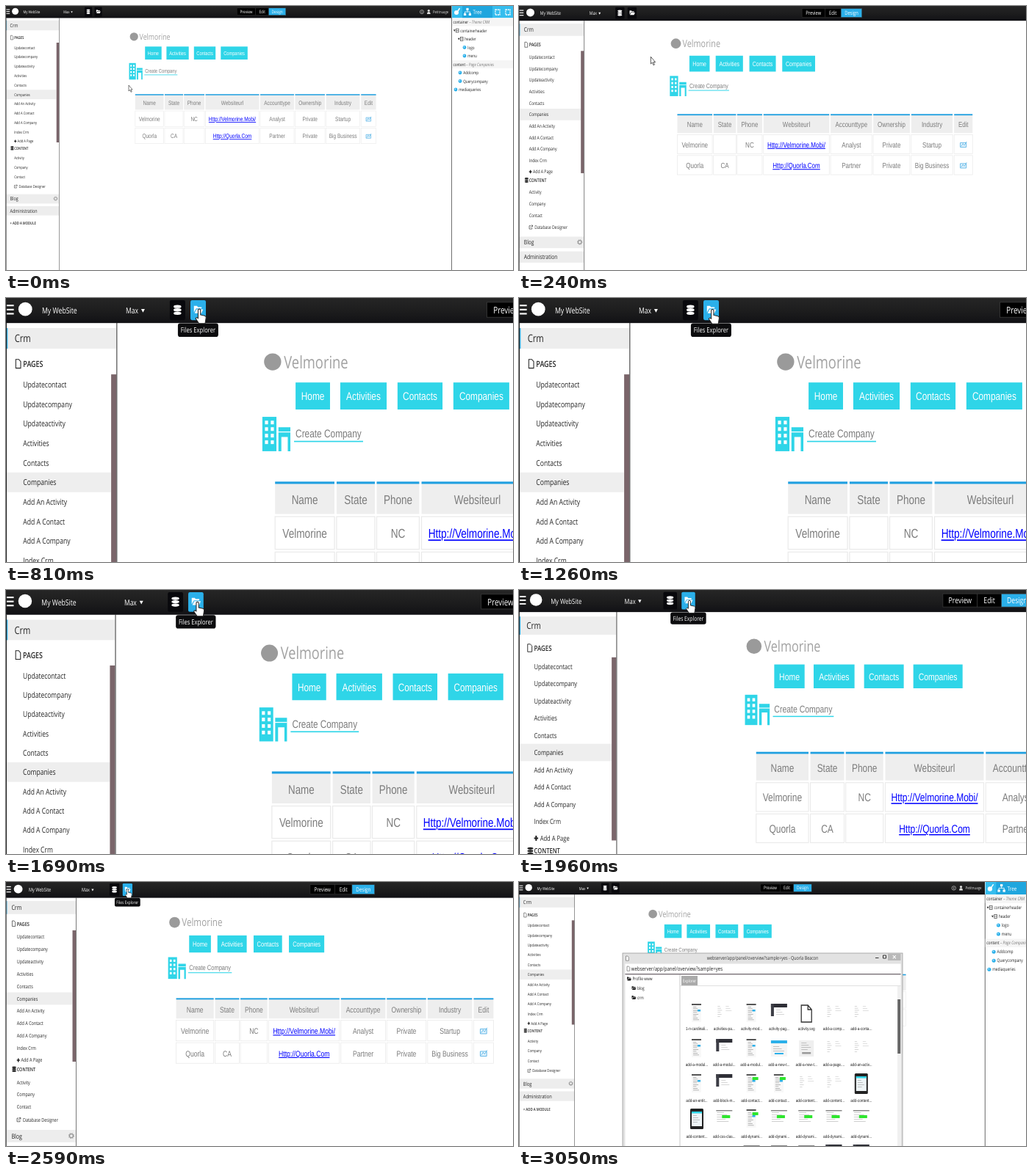
An HTML page for the animation above (5.18 s loop, 690x360 px).

```html
<!DOCTYPE html>
<html lang="en">
<head>
<meta charset="utf-8">
<title>Files explorer demo</title>
<style>
  html, body { margin: 0; width: 100%; height: 100%; overflow: hidden; background: #fff; }
  svg { display: block; width: 690px; height: 360px; }
  text { font-family: "Open Sans", sans-serif; text-rendering: geometricPrecision; white-space: pre; }
  .page { font-family: "Liberation Sans", Arial, sans-serif; }
  .semi { font-weight: 600; }
  .link { text-decoration: underline; }
</style>
</head>
<body>
<svg id="stage" viewBox="0 0 690 360"></svg>
<script>
const LOOP = 5180, STEP = 30;
const SQUEEZE = 0.78;
const CYAN = '#2fd5e8', BLUE = '#2bb0ea', INK = '#262626', GREY = '#7c7c7c';

// ---- drawing helpers; text is centred vertically on y ----
const rect = (x, y, w, h, fill, extra = '') =>
  `<rect x="${x}" y="${y}" width="${w}" height="${h}" fill="${fill}" ${extra}/>`;
const circle = (x, y, r, fill, extra = '') =>
  `<circle cx="${x}" cy="${y}" r="${r}" fill="${fill}" ${extra}/>`;
const path = (d, fill, stroke = 'none', width = 1) =>
  `<path d="${d}" fill="${fill}" stroke="${stroke}" stroke-width="${width}"/>`;
const text = (x, y, str, size, fill, cls = '', anchor = 'start') =>
  `<text transform="translate(${x} ${y + size * 0.36}) scale(${SQUEEZE} 1)" font-size="${size}"
    fill="${fill}" class="${cls}" text-anchor="${anchor}">${str}</text>`;
const mid = (x, y, str, size, fill, cls) => text(x, y, str, size, fill, cls, 'middle');
const group = (id, content) => `<g id="${id}">${content}</g>`;

const database = (x, y, k, fill) => [-2, 0, 2].map(i =>
  `<ellipse cx="${x}" cy="${y + i * k}" rx="${2.3 * k}" ry="${0.95 * k}" fill="${fill}"/>`).join('');
const folder = (x, y, k, fill) =>
  path(`M${x} ${y}h${2 * k}l${0.6 * k} ${0.8 * k}h${2.4 * k}v${0.9 * k}h${-3.6 * k}l${-1.4 * k} ${2.6 * k}z` +
       `M${x + 1.7 * k} ${y + 2.2 * k}h${4.3 * k}l${-1.1 * k} ${2.6 * k}h${-4.5 * k}z`, fill);
const sheet = (x, y) => path(`M${x} ${y}h2.4l1.4 1.6v4.6h-3.8z`, '#fff', '#555', 0.6);

// ---- top bar ----
function topBar() {
  const modes = [['Preview', 314.2, 339.7], ['Edit', 339.7, 357.5], ['Design', 357.5, 380.8]];
  return rect(0, 0, 690, 16.4, 'url(#bar)') +
    [4.9, 7.6, 10.3].map(y => rect(0.5, y - 0.5, 4.6, 1, '#fff')).join('') +
    circle(12.6, 7.3, 4.5, '#fff') +
    text(23.5, 8.2, 'My WebSite', 5.4, '#fff') +
    text(78.2, 8.2, 'Max', 5.3, '#fff') +
    path('M88.3 7.2h2.4l-1.2 2.3z', '#fff') +
    rect(107, 1.5, 10.1, 13, '#08080c', 'rx="1"') + database(112, 7.8, 1.1, '#fff') +
    rect(120.5, 1.5, 10.1, 13, '#08080c', 'rx="1"') +
    group('active', rect(120.5, 1.5, 10.1, 13, BLUE, 'rx="1"')) +
    folder(122.8, 5.2, 1, '#fff') +
    modes.map(([label, a, b], i) =>
      rect(a, 2.8, b - a, 9.8, i === 2 ? BLUE : '#000', 'stroke="#3a3a3a" stroke-width=".4"') +
      mid((a + b) / 2, 7.8, label, 6.1, '#fff')).join('') +
    circle(566, 8, 2.6, 'none', 'stroke="#ddd" stroke-width=".6"') + rect(565.7, 6.6, 0.7, 3, '#ddd') +
    circle(575.3, 6.3, 1.5, '#ddd') + path('M573 11q0-3 2.3-3t2.3 3z', '#ddd') +
    text(581, 8, 'Petitnuage', 5.4, '#ddd');
}

// ---- left sidebar ----
function sidebar() {
  const pages = ['Updatecontact', 'Updatecompany', 'Updateactivity', 'Activities', 'Contacts',
    'Companies', 'Add An Activity', 'Add A Contact', 'Add A Company', 'Index Crm'];
  const tab = (y, h, label) => rect(0.5, y, 71.5, h, '#ededed') +
    text(5.6, y + h / 2, label, 6.9, INK);
  return rect(0, 16.3, 72.5, 344, '#fff') +
    tab(19.7, 13.5, 'Crm') + rect(0.5, 19.7, 0.6, 13.5, BLUE) +
    path('M6.4 40.2h2l1.2 1.4v4.3h-3.2z', 'none', INK, 0.5) +
    text(11.2, 43.2, 'PAGES', 5.5, INK, 'semi') +
    rect(0.5, 114.2, 68, 12.9, '#eee') +
    pages.map((p, i) => text(11.2, 56.7 + 12.8 * i, p, 5.3, INK)).join('') +
    path('M11.2 184.4h3M12.7 182.5v3.8', 'none', '#222', 1.1) +
    text(15.6, 184.4, 'Add A Page', 5.3, INK) +
    database(8.4, 193.8, 0.95, INK) + text(11.2, 193.8, 'CONTENT', 5.3, INK, 'semi') +
    ['Activity', 'Company', 'Contact'].map((p, i) => text(11.2, 207.3 + 12.8 * i, p, 5.3, INK)).join('') +
    path('M13 244.5h-1.6v3.6h3v-1.4M12.7 246.7l2.2-2.5M13.5 244h1.6v1.8', 'none', INK, 0.5) +
    text(17.4, 246, 'Database Designer', 5.3, INK) +
    rect(68.7, 50, 3.4, 136, '#7a656a') +
    tab(256.6, 12.8, 'Blog') +
    circle(67.5, 262.7, 1.9, 'none', 'stroke="#999" stroke-width="1"') +
    circle(67.5, 262.7, 2.6, 'none', 'stroke="#999" stroke-width=".8" stroke-dasharray="1 1.04"') +
    tab(273, 12.6, 'Administration') +
    text(5.4, 296, '+ ADD A MODULE', 5.4, INK, 'semi') +
    rect(72.1, 16.3, 0.6, 344, '#555') + rect(0, 16.3, 0.5, 344, '#222');
}

// ---- web page in the middle ----
function building() {
  const windows = [80.3, 84.6, 88.9, 93.2].map(y =>
    rect(169.2, y, 2, 2.4, '#fff') + rect(173, y, 2, 2.4, '#fff')).join('');
  return rect(167.5, 77.8, 9.2, 22.5, CYAN) + windows +
    path('M178 84.6h7.8v15.7h-1.7v-9.3h-4.2v9.3h-1.9z', CYAN) +
    rect(177.6, 87.4, 8.2, 0.6, '#fff');
}

function table() {
  const cols = [[175.8, 214.6], [216, 241], [242.2, 270], [271.5, 344.5],
    [346, 392], [393.4, 434], [435.6, 481.5], [483.2, 503.6]];
  const head = ['Name', 'State', 'Phone', 'Websiteurl', 'Accounttype', 'Ownership', 'Industry', 'Edit'];
  const rows = [
    ['Velmorine', '', 'NC', 'Http://Velmorine.Mobi/', 'Analyst', 'Private', 'Startup'],
    ['Quorla', 'CA', '', 'Http://Quorla.Com', 'Partner', 'Private', 'Big Business']];
  return cols.map(([a, b], c) => {
    const x = (a + b) / 2, w = b - a;
    return rect(a, 121, w, 20.4, '#eee') + rect(a, 120.2, w, 1.5, '#1f9fe0') +
      mid(x, 132, head[c], 8.3, GREY, 'page') +
      rows.map((row, r) => {
        const y = 154.1 + 23.2 * r;
        const content = c === 7
          ? path(`M${x - 3.4} ${y + 3}v-5h6.6v5zM${x - 2.4} ${y + 2}l2-3 1.4 2 2.6-4.2`, '#e4f4fd', '#5ab4e6', 0.7)
          : mid(x, y, row[c], 8.4, c === 3 ? '#00f' : GREY, c === 3 ? 'page link' : 'page');
        return rect(a, y - 11, w, 21.4, '#fff', 'stroke="#eaeaea" stroke-width=".6"') + content;
      }).join('');
  }).join('');
}

function webPage() {
  const nav = [['Home', 189.2, 211.7], ['Activities', 218.4, 248.7],
    ['Contacts', 255.8, 285.2], ['Companies', 292.3, 328.8]];
  return group('band', rect(72.5, 16.3, 540, 29, '#efefef')) +
    circle(174.2, 41.8, 5.6, '#9a9a9a') +
    text(181.6, 41.8, 'Velmorine', 11.3, '#a2a2a2') +
    nav.map(([label, a, b]) => rect(a, 55.3, b - a, 17.7, CYAN) +
      mid((a + b) / 2, 64.2, label, 7.3, '#fff', 'page')).join('') +
    building() +
    text(189.2, 88.5, 'Create Company', 7.3, GREY, 'page') +
    rect(188.2, 93.5, 45.1, 0.8, CYAN) +
    table();
}

// ---- tree panel on the right ----
function treePanel() {
  const row = i => 22 + 11.5 * i;
  const title = (i, name, note) => rect(607, row(i) - 5.4, 83, 10.8, '#f5f5f5') +
    text(608.4, row(i), `${name} <tspan fill="#777" font-style="italic">– ${note}</tspan>`, 6, '#222');
  const branch = (i, x, name) => path(`M${x} ${row(i) - 1.2}h2.6l-1.3 2.6z`, INK) +
    rect(x + 3.6, row(i) - 2.4, 3.4, 4.8, '#fff', 'stroke="#444" stroke-width=".7"') +
    path(`M${x + 3.6} ${row(i)}h3.4`, 'none', '#444', 0.6) + text(x + 9.2, row(i), name, 6, '#222');
  const leaf = (i, x, name) => circle(x, row(i), 2.4, BLUE) + circle(x - 0.5, row(i) - 0.6, 0.8, '#bfe8fa') +
    text(x + 4.2, row(i), name, 6, '#222');
  const square = x => rect(x - 3, 5, 6, 7, 'none', 'stroke="#fff" stroke-width="1.3" stroke-dasharray="2 .8"');
  return rect(606.4, 0, 84, 360, '#fff') + rect(606.2, 16, 0.7, 344, '#333') +
    rect(607, 0, 83, 16.2, '#35bdee') + rect(621, 0, 41, 16.2, '#1fa6de') +
    circle(613, 9, 3, '#fff') + path('M613.5 9l4-6', 'none', '#fff', 1.4) +
    path('M628 4v4M624.5 11v-3h7v3', 'none', '#fff', 0.8) +
    rect(626.4, 2.8, 3.2, 3, '#fff') + rect(623, 10, 3.2, 3, '#fff') + rect(629.8, 10, 3.2, 3, '#fff') +
    text(635.5, 8.4, 'Tree', 7.8, '#fff') + square(669) + square(683) +
    title(0, 'container', 'Theme CRM') + branch(1, 609, 'containerheader') + branch(2, 615, 'header') +
    leaf(3, 624, 'logo') + leaf(4, 624, 'menu') +
    title(5, 'content', 'Page Companies') + leaf(6, 618, 'Addcomp') + leaf(7, 618, 'Querycompany') +
    leaf(8, 612, 'mediaqueries');
}

// ---- explorer window ----
function lines(x, y, w, n, gap, fill) {
  let out = '';
  for (let i = 0; i < n; i++) out += rect(x, y + i * gap, w * (0.55 + 0.45 * ((i * 7 % 5) / 4)), 0.7, fill);
  return out;
}

// One thumbnail per letter, centred on x
const thumbs = {
  n: (x, y) => rect(x - 7, y - 12, 13, 25, '#f8f8f8') + rect(x - 7, y - 12, 13, 2, '#555') +
    lines(x - 5, y - 8, 8, 8, 2.5, '#999') + rect(x + 1, y - 4, 4, 2.5, BLUE),
  w: (x, y) => lines(x - 9, y - 9, 6, 6, 2.8, '#c4c4c4') + lines(x + 2, y - 9, 8, 3, 3, '#d2d2d2'),
  d: (x, y) => rect(x - 11, y - 12, 22, 5, '#2e2f36') + rect(x - 11, y - 12, 4, 17, '#3c3d45') +
    lines(x - 4, y - 4, 11, 3, 3, '#c4c4c4'),
  f: (x, y) => path(`M${x - 7} ${y - 10}h9l5 6v17h-14zM${x + 2} ${y - 10}v6h5`, '#fff', '#333', 1.3),
  c: (x, y) => rect(x - 11, y - 10, 22, 22, '#f5f5f5') + rect(x - 11, y - 10, 22, 4, BLUE) +
    lines(x - 8, y - 2, 15, 3, 3, '#aaa') + rect(x - 6, y + 7, 12, 2, BLUE),
  e: (x, y) => rect(x - 10, y - 10, 20, 22, '#efefef') + lines(x - 7, y - 7, 13, 4, 3, '#aaa') +
    rect(x - 6, y + 6, 12, 2.5, '#999'),
  t: (x, y) => rect(x - 9, y - 13, 18, 28, '#222', 'rx="1.5"') + rect(x - 7, y - 9, 14, 20, '#eef4f6') +
    rect(x - 7, y - 9, 14, 2.5, CYAN) + lines(x - 5, y - 4, 9, 4, 3, '#aaa'),
  k: (x, y) => thumbs.n(x, y) + rect(x + 1, y - 8, 8, 4, '#2ee62e'),
  g: (x, y) => rect(x - 11, y - 11, 22, 1.5, '#888') + lines(x - 10, y - 8, 18, 5, 3, '#bbb') +
    rect(x - 3, y - 4, 11, 4, '#2ee62e')
};

function explorer() {
  const address = 'webserver/app/panel/overview?sample=yes';
  const files = [
    ['nwndfww', ['1-n-cardinali', 'activities-pa', 'activity-mod', 'activity-pag', 'activity.svg', 'add-a-comp', 'add-a-conta']],
    ['ndnceww', ['add-a-modul', 'add-a-modul', 'add-a-modul', 'add-a-new-t', 'add-a-new-t', 'add-a-page.', 'add-an-activ']],
    ['ndkkwwt', ['add-an-entit', 'add-block-m', 'add-contact', 'add-contact', 'add-content', 'add-content', 'add-content']],
    ['tgkgggg', ['add-content', 'add-css-clas', 'add-dynami', 'add-dynami', 'add-dynami', 'add-dynami', 'add-dynami']],
    ['wwgggdd', []]];
  const grid = files.map(([kinds, names], r) => [...kinds].map((kind, c) => {
    const x = 242 + 37.3 * c, y = 178 + 48 * r, name = names[c] || '';
    return thumbs[kind](x, y) +
      mid(x, 200 + 49 * r, name + (/svg|^$/.test(name) ? '' : '...'), 6.1, '#222', 'page');
  }).join('')).join('');
  const tree = [['Profile www', 147, 132], ['blog', 153.5, 144.7], ['crm', 153.5, 157.5]];
  return rect(141, 97, 381, 266, '#e2e2e2', 'stroke="#999" stroke-width=".8"') +
    sheet(145.5, 101) + mid(331.5, 104, address + ' - Quorla Beacon', 6.9, '#333') +
    rect(502, 97.5, 17.5, 9.5, '#b9b9b9') +
    path('M485 103.5h4.5M495.5 100h4v4h-4z', 'none', '#333', 1) +
    path('M508.8 100l4 4.4M512.8 100l-4 4.4', 'none', '#fff', 1.1) +
    rect(144.5, 111.5, 375, 250, '#fff') +
    sheet(147, 115) + text(152.8, 118, address, 7.8, '#222') +
    rect(144.5, 125.2, 375, 1, '#4a3f48') +
    tree.map(([name, x, y]) => folder(x, y - 2.4, 1, '#222') + text(x + 7.4, y, name, 6.2, '#222')).join('') +
    rect(218.6, 126, 0.8, 236, '#bbb') +
    rect(221, 128, 22, 13, '#aaa') + mid(232, 134.5, 'Explorer', 6.1, '#fff') +
    rect(219.5, 141, 300, 0.6, '#ccc') +
    grid +
    rect(515, 142, 4.4, 218, '#f0f0f0') + rect(515.2, 160, 4, 74, '#666');
}

const arrow = path('M0 0v8l1.7-1.6 1.3 3 1.2-.6-1.3-2.8h2.2z', '#fff', '#222', 0.6);
const hand = path('M-.8 .6q.8-1.2 1.6 0v3.2l2.8.6q.9.3.8 1.3l-.6 3.8h-4l-2.2-3.2q.3-1.2 1.6-.2z', '#fff', '#222', 0.5);

const stage = document.getElementById('stage');
stage.innerHTML =
  `<defs><linearGradient id="bar" x2="0" y2="1"><stop offset="0" stop-color="#262626"/>
   <stop offset=".6" stop-color="#1b1b1c"/><stop offset="1" stop-color="#111115"/></linearGradient></defs>` +
  group('scene', webPage() + sidebar() + topBar() + treePanel() +
    group('tip', rect(112.3, 16.6, 26.4, 8.9, '#0c0c0e', 'rx="1.5"') +
      mid(125.5, 21, 'Files Explorer', 4.7, '#fff')) +
    group('arrow', arrow) + group('hand', hand)) +
  group('explorer', explorer());

// ---- motion ----
const part = Object.fromEntries(['scene', 'band', 'active', 'tip', 'arrow', 'hand', 'explorer']
  .map(id => [id, document.getElementById(id)]));
const show = (el, on) => el.setAttribute('visibility', on ? 'visible' : 'hidden');

const ZOOM = { from: 90, to: 810, peak: 2.083, back: 1690, perStep: 0.0247, steps: 42 };
const POPUP = 3050;
const trail = [[0, 167, 108], [60, 167, 108], [390, 129.3, 14], [450, 127.5, 9.8], [600, 126.3, 7.2],
  [1110, 126.3, 7.2], [1560, 126.6, 7.9], [1690, 126.6, 7.9], [2590, 125.6, 7]];

function zoomAt(t) {
  if (t >= ZOOM.back) {
    const n = Math.min(ZOOM.steps, Math.floor((t - ZOOM.back) / STEP) + 1);
    return ZOOM.peak - ZOOM.perStep * n;
  }
  const now = Math.floor(t / STEP) * STEP;
  const p = Math.min(1, Math.max(0, (now - ZOOM.from) / (ZOOM.to - ZOOM.from)));
  return 1 + (ZOOM.peak - 1) * p;
}

function pointerAt(t) {
  const i = trail.findIndex(k => k[0] > t);
  if (i < 0) return trail[trail.length - 1].slice(1);
  const [a, b] = [trail[i - 1], trail[i]], p = (t - a[0]) / (b[0] - a[0]);
  return [a[1] + (b[1] - a[1]) * p, a[2] + (b[2] - a[2]) * p];
}

function draw(t) {
  const opened = t >= POPUP, [x, y] = pointerAt(t);
  part.scene.setAttribute('transform', `scale(${zoomAt(t)})`);
  for (const el of [part.arrow, part.hand]) el.setAttribute('transform', `translate(${x} ${y})`);
  show(part.band, t >= 330 && t < 480);
  show(part.active, t >= 480 && !opened);
  show(part.tip, t >= 630 && !opened);
  show(part.arrow, y >= 16 && !opened);
  show(part.hand, y < 16 && !opened);
  show(part.explorer, opened);
}

const start = performance.now();
function tick() {
  draw((performance.now() - start) % LOOP);
  requestAnimationFrame(tick);
}
tick();
</script>
</body>
</html>
```
